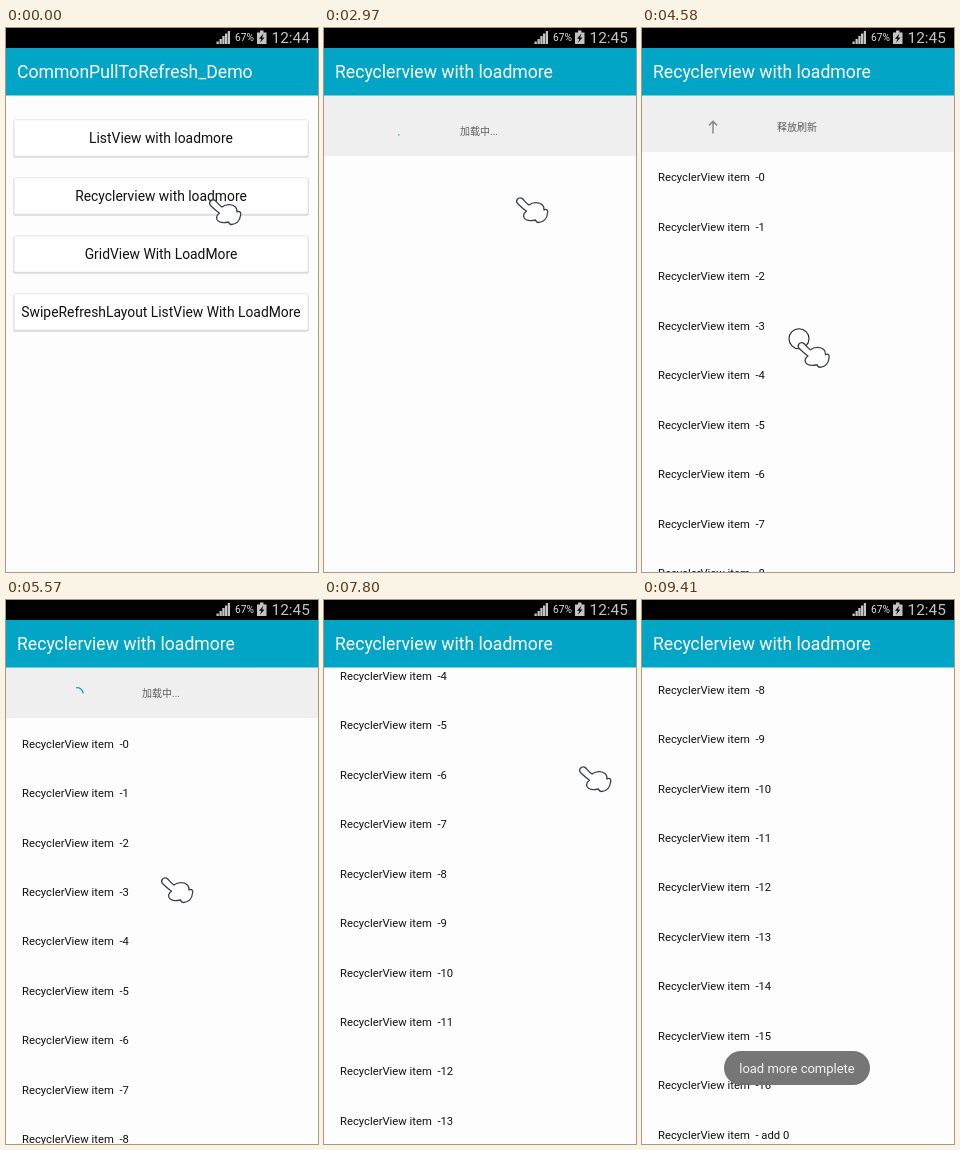
Animation, 312 px wide and 544 px high, one loop 9.85 s. Source, as an HTML page:

```html
<!DOCTYPE html>
<html lang="en">
<head>
<meta charset="utf-8">
<title>Pull to refresh demo</title>
<style>
html, body { margin: 0; width: 100%; height: 100%; overflow: hidden; background: #fdfdfd; }
svg { display: block; width: 100vw; height: 100vh; }
text { font-family: Roboto, "Noto Sans CJK SC", "Noto Sans CJK", sans-serif; white-space: pre; }
.title { font-size: 17.6px; fill: #fff; }
.label { font-size: 13.87px; fill: #111; text-anchor: middle; }
.row { font-size: 11.25px; fill: #111; }
.hint { font-size: 10px; fill: #5c5c5c; text-anchor: middle; }
</style>
</head>
<body>
<svg viewBox="0 0 312 544" xmlns="http://www.w3.org/2000/svg">
  <rect width="312" height="544" fill="#fdfdfd"/>
  <g id="menu">
    <rect y="19" width="312" height="48.500" fill="#03a5c6"/>
    <text class="title" x="11" y="50">CommonPullToRefresh_Demo</text>
  </g>
  <rect id="dim" width="312" height="544"/>
  <g id="page">
    <rect y="67" width="312" height="477" fill="#fdfdfd"/>
    <rect id="head" y="67" width="312" fill="#efefef"/>
    <g id="pull">
      <text id="hint" class="hint" x="155" y="4.500"></text>
      <path id="arrow" d="M0-6V6M-4 2L0 6L4 2" fill="none" stroke="#8a8a8a" stroke-width="1.500"/>
      <path id="spin" fill="none" stroke="#03a5c6" stroke-width="1.300"/>
    </g>
    <g id="rows"></g>
    <g id="foot">
      <rect width="312" height="35" fill="#e0e0e0"/>
      <text class="hint" x="160" y="21">正在加载中...</text>
      <path id="footSpin" fill="none" stroke="#03a5c6" stroke-width="1.300"/>
    </g>
    <rect y="20" width="312" height="47.500" fill="#03a5c6"/>
    <text class="title" x="11" y="50">Recyclerview with loadmore</text>
  </g>
  <rect width="312" height="20" fill="#000"/>
  <g fill="#c4c4c4">
    <path d="M210.500 16v-2.500h2.300v2.500zM213.500 16v-5h2.300v5zM216.300 16v-8h2.300v8zM219 16v-10.500h2.300v10.500zM221.800 16v-13h2.200v13z"/>
    <path d="M251 4.500h3v-2h3.500v2h3v11.500h-9.500z"/>
    <path d="M257.500 5.500l-4.500 5.200h2.500l-1.500 4l4.500-5.200h-2.500z" fill="#000"/>
    <text x="229" y="13.200" font-size="10.200" fill="#ddd">67%</text>
    <text id="clock" x="265.500" y="15" font-size="15.400"></text>
  </g>
  <g id="toast">
    <rect x="82" y="451" width="146" height="34" rx="17" fill="#6e6e6e" fill-opacity=".94"/>
    <text x="155" y="472.500" font-size="13" fill="#f4f4f4" text-anchor="middle">load more complete</text>
  </g>
  <g id="hand">
    <circle id="ring" r="10" fill="none" stroke="#222" stroke-width="1.1"/>
    <path id="glove" d="M0 7C-2.500 4 1 .5 4 1.700C6.500 3 8 6.500 11.500 8.500C15 5.500 22 5 25 8.500C26.500 10 26.500 12 26.500 13.500C29 12 31 14 30 17C29.500 22 26 26 21 26C19.500 26 18.500 25 18 23.500C13 24.500 8 24 6.500 21C5.500 18.500 6.500 16.500 9 14.800C6 12.500 3 10 0 7Z" fill="#fff" stroke="#3b4048" stroke-width="1.300" stroke-linejoin="round"/>
  </g>
</svg>
<script>
const LOOP = 9850, FIRST = 1110, LAST = 9410, STEP = (LAST - FIRST) / 93;
const TOP = 67, ROW = 49.45, COUNT = 17;
const OPENED = 1267, LISTED = 3420, REFRESHED = 6370, ADDED = 8790;
const NS = "http://www.w3.org/2000/svg";
const el = {};
document.querySelectorAll("[id]").forEach(n => el[n.id] = n);

const set = (n, name, value) => n.setAttribute(name, value);
const show = (n, on) => set(n, "display", on ? "inline" : "none");
const move = (n, x, y) => set(n, "transform", `translate(${x} ${y})`);
const clamp = v => Math.max(0, Math.min(1, v));
const smooth = u => u * u * (3 - 2 * u);

function add(parent, tag, attrs, text) {
  const n = document.createElementNS(NS, tag);
  for (const k in attrs) set(n, k, attrs[k]);
  if (text) n.textContent = text;
  parent.appendChild(n);
  return n;
}

// Eased value of one column in a list of [time, value, ...] stops
function along(stops, t, col = 1) {
  let a = stops[0];
  for (const b of stops) {
    if (t < b[0]) {
      const u = b === a ? 0 : smooth((t - a[0]) / (b[0] - a[0]));
      return a[col] + (b[col] - a[col]) * u;
    }
    a = b;
  }
  return a[col];
}

const handPath = [
  [2700, 204.5, 170.5], [2960, 193.5, 168.5], [3300, 193.5, 168.5],
  [4000, 157, 229], [4350, 157, 229], [4500, 157, 300], [4700, 157, 325],
  [4850, 157, 325], [5200, 156.5, 276.5], [5700, 156.5, 276.5],
  [6200, 159, 281], [6780, 159, 281], [7180, 197, 54], [7250, 197, 54],
  [7350, 205, 76], [7780, 256.5, 165.5], [7820, 256.5, 165.5],
  [7990, 275, 439], [8330, 278, 241.5], [8450, 278, 241.5], [9050, 326, 300]
];
const presses = [[470, 560], [4100, 4850], [6700, 7210], [7980, 8400]];
const headHeight = [
  [1450, 0], [2080, 61], [LISTED, 61], [3900, 0], [4415, 0], [4500, 50],
  [4700, 66], [4850, 66], [5150, 51], [REFRESHED, 51], [6740, 0]
];
const scroll = [[6810, 0], [7180, 214.6], [8010, 214.6], [8330, 398.6]];
const toastFade = [[8880, 0], [9150, 1]];

["ListView with loadmore", "Recyclerview with loadmore", "GridView With LoadMore",
 "SwipeRefreshLayout ListView With LoadMore"].forEach((label, i) => {
  const y = 91.5 + 58 * i;
  add(el.menu, "rect", { x: 7.5, y: y + 1, width: 295, height: 37, rx: 1.5, fill: "#c9c9c9" });
  add(el.menu, "rect", { x: 8, y: y + .3, width: 294, height: 36.4, rx: 1.5, fill: "#fefefe", stroke: "#e2e2e2", "stroke-width": .8 });
  add(el.menu, "text", { class: "label", x: 155, y: y + 23.5 }, label);
});

const rows = Array.from({ length: COUNT + 1 }, (_, i) =>
  add(el.rows, "text", { class: "row", x: 16 }, "RecyclerView item  -" + (i < COUNT ? i : " add 0")));

function arc(cx, cy, r, from, sweep) {
  const at = deg => {
    const a = deg * Math.PI / 180;
    return `${cx + r * Math.cos(a)} ${cy + r * Math.sin(a)}`;
  };
  return `M${at(from)}A${r} ${r} 0 ${sweep > 180 ? 1 : 0} 1 ${at(from + sweep)}`;
}

// The arc is shortest at time "thin" and every 1333 ms from there
function spinner(cx, cy, t, thin, from) {
  const sweep = 12 + 250 * Math.sin(Math.PI * (t - thin) / 1333) ** 2;
  return arc(cx, cy, 5 + 1.2 * Math.min(1, sweep / 90), from, sweep);
}

function hintFor(t, height) {
  if (t < 4000) return t < 1950 ? "下拉刷新" : t < LISTED ? "加载中..." : "更新完成";
  if (t < 4850) return height < 51 ? "下拉刷新" : "释放刷新";
  return t < REFRESHED ? "加载中..." : "更新完成";
}

function drawPull(t) {
  const height = along(headHeight, t), hint = hintFor(t, height);
  set(el.head, "height", height);
  move(el.pull, 0, TOP + height - 25.5);
  el.hint.textContent = hint;
  show(el.arrow, /刷新/.test(hint));
  set(el.arrow, "transform", `translate(71 1) rotate(${hint === "释放刷新" ? 180 : 0})`);
  show(el.spin, hint === "加载中...");
  set(el.spin, "d", t < LISTED
    ? spinner(71, 1, t, 2984, 35 + (t - 2984) * .3)
    : spinner(71, 1.4, t, 5311, -100 + (t - 5572) * .3));
  return height;
}

function drawList(t, height) {
  const offset = height - along(scroll, t);
  show(el.rows, t >= LISTED);
  rows.forEach((n, i) => set(n, "y", 96.6 + ROW * i + offset));
  show(rows[COUNT], t >= ADDED);
  move(el.foot, 0, TOP + ROW * COUNT + offset);
  show(el.foot, t >= LISTED && t < ADDED);
  set(el.footSpin, "d", spinner(115, 17.5, t, 8000, t * .3));
}

function drawOpening(t) {
  const since = t - OPENED, alpha = clamp(since / 110);
  show(el.page, since > 0);
  set(el.page, "opacity", alpha);
  set(el.dim, "opacity", .12 * alpha);
  move(el.page, 0, 43.5 * (1 - clamp(since / 350)) ** 5);
}

function draw(t) {
  drawOpening(t);
  drawList(t, drawPull(t));
  el.clock.textContent = t < FIRST ? "12:44" : "12:45";
  set(el.toast, "opacity", along(toastFade, t));

  const pressed = presses.some(([a, b]) => t >= a && t < b);
  move(el.hand, along(handPath, t, 1), along(handPath, t, 2));
  show(el.ring, pressed);
  move(el.glove, 0, pressed ? 2.5 : 0);
}

function stepped(t) {
  if (t < FIRST) return t;
  return Math.min(LAST, FIRST + STEP * Math.floor((t - FIRST + 15) / STEP));
}

const start = performance.now();
function tick() {
  draw(stepped((performance.now() - start) % LOOP));
  requestAnimationFrame(tick);
}
tick();
</script>
</body>
</html>
```
